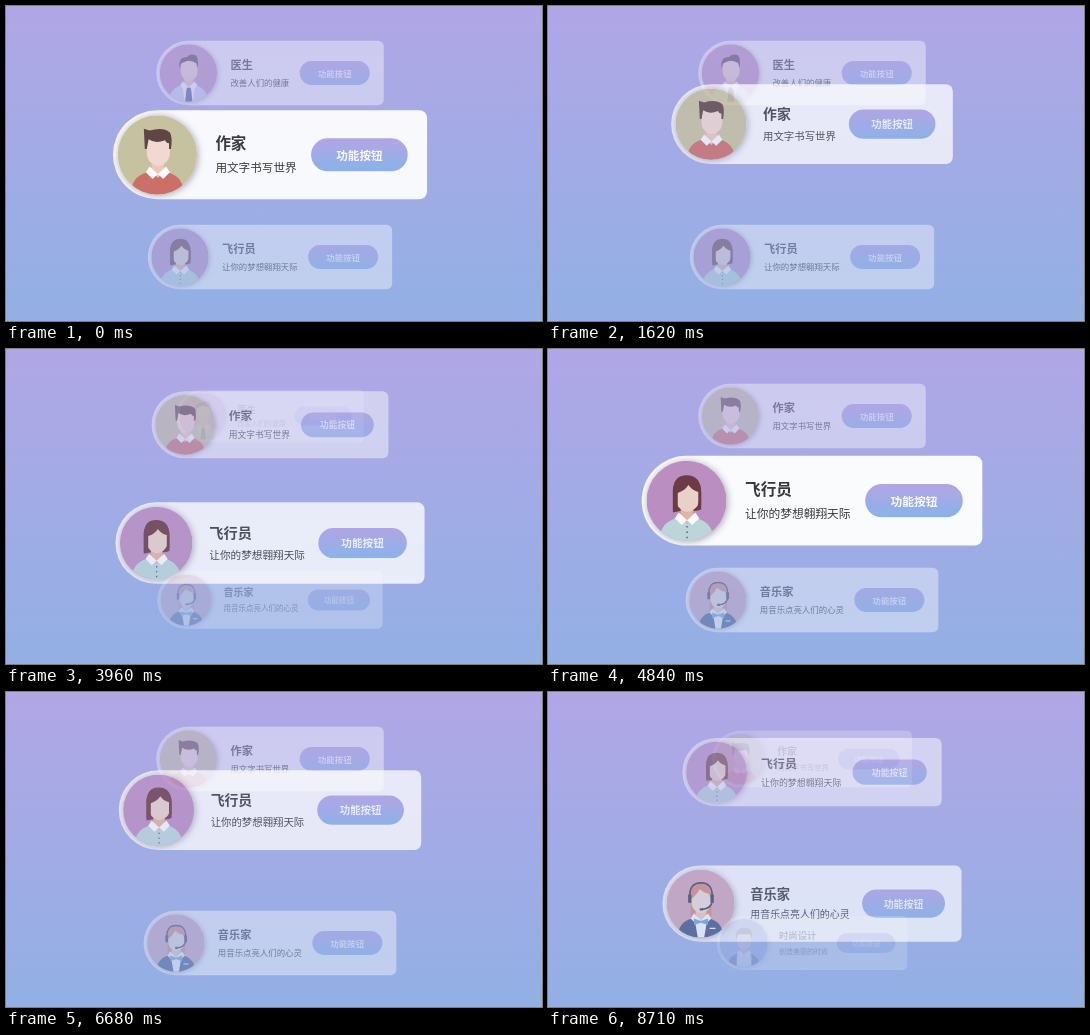
Recreate the animation shown at these times as an HTML page. Size 536 by 315 pixels, loop 8.78 s.

```html
<!DOCTYPE html>
<html lang="zh-CN">
<head>
<meta charset="utf-8">
<title>职业卡片轮播</title>
<style>
html, body { margin: 0; width: 100%; height: 100%; overflow: hidden; }
body {
  position: relative;
  background: linear-gradient(#b1a6e6, #92b0e4);
  font-family: "Noto Sans CJK SC", "Noto Sans CJK", sans-serif;
  color: #333;
}
.card {
  position: absolute; left: 263.5px; top: 113px;
  box-sizing: border-box; height: 92px; padding: 5px 20px 5px 5px;
  display: flex; align-items: center; overflow: hidden;
  background: #fff; border-radius: 46px 8px 8px 46px;
  white-space: nowrap;
}
.card svg {
  width: 82px; height: 82px; border-radius: 50%;
  box-shadow: 1px 1px 8px rgba(50, 40, 70, .42);
}
.info { margin: 0 15px 0 19px; line-height: 26px; font-size: 12px; }
.info b { display: block; font-size: 16px; }
.btn {
  width: 100px; height: 34px; border-radius: 17px;
  background: linear-gradient(#b4a5e4, #88b4ea);
  color: #fff; font-size: 12px; font-weight: 600;
  line-height: 34px; text-align: center;
}
</style>
</head>
<body>
<script>
const shape = (fill, d) => `<path fill="${fill}" d="${d}"/>`;
const line = (color, width, d, dash = 'none') =>
  `<path fill="none" stroke="${color}" stroke-width="${width}" stroke-dasharray="${dash}" d="${d}"/>`;
const torso = fill => shape(fill, 'M13 84Q13 64 30 59L41 57L52 59Q69 64 69 84Z');
const neck = fill => shape(fill, 'M35 46H48V57L41.500 65L35 57Z');
const face = fill => shape(fill, 'M30 24H54V39Q54 47 47 51Q42 54 37 51Q30 47 30 39Z');
const collar = shape('#fff', 'M33 53L41.500 61L50 53L54 59L47 66L41.500 61L36 66L29 59Z');

const people = [
  ['医生', '改善人们的健康', '#bb8dbd',
    torso('#c6d8ee') + shape('#fff', 'M32 57H51L47 84H36Z') + neck('#e6c3ae') + collar +
    shape('#41558d', 'M39 62H44L45 66L47 84H36L38 66Z') + face('#ecd5c5') +
    shape('#49394a', 'M28 35V27Q29 18 39 18Q43 12 52 16Q56 21 54 34L52 27Q44 21 36 25L31 27Z')],
  ['作家', '用文字书写世界', '#c9c49b',
    torso('#cf6c60') + neck('#f0cbb8') + collar + face('#f5ddcf') +
    shape('#593f38', 'M28 35L27 14L33 16Q47 12 54 18Q57 23 55 35L53 35V29Q50 29 49 26Q39 30 32 25L30 35Z')],
  ['飞行员', '让你的梦想翱翔天际', '#bd8dc0',
    shape('#6a363f', 'M27 53V30Q28 15 41 15Q55 15 56 31V50Q49 53 42 50Z') +
    torso('#bdd8d9') + neck('#e7b59c') + collar + face('#ecd4c6') +
    shape('#6a363f', 'M27 50V28Q31 15 43 16Q56 18 56 33V46L53 45V32Q46 30 43 25Q39 31 32 33V50Z') +
    line('#4d5b70', 1.5, 'M41.500 67V80', '1.5 4')],
  ['音乐家', '用音乐点亮人们的心灵', '#d4a5b6',
    shape('#dd8671', 'M29 32H54V58H29Z') + torso('#3f4f80') +
    shape('#fff', 'M33 55H50L45 84H38Z') + neck('#efccbc') + collar + face('#f2dfd6') +
    shape('#dd8671', 'M29 36Q27 18 41 17Q55 18 54 36L51 29Q44 28 40 23Q37 30 29 36Z') +
    shape('#69a5dd', 'M33 59L41.500 62L50 59V67L41.500 64L33 67Z') +
    line('#3b3850', 2, 'M28 34Q27 16 41.500 16Q56 16 55 34M55 38Q54 47 43 48') +
    line('#3b3850', 4, 'M28 30V40M55 30V40') +
    line('#3b3850', 3, 'M40 48H44') + line('#fff', 1.5, 'M52 71H59')],
  ['时尚设计', '创造美丽的时尚', '#8d9fd6',
    torso('#39476f') + shape('#e8edf5', 'M29 62H54V84H29Z') + neck('#d9b39d') +
    collar + face('#d8c8cf') +
    shape('#5a5570', 'M28 34Q26 15 41 15Q57 15 55 34L52 26H32Z')]
];

const cards = people.map(([title, text, color, art]) => {
  const card = document.createElement('div');
  card.className = 'card';
  card.innerHTML = `<svg viewBox="0 0 82 82"><path fill="${color}" d="M0 0H82V82H0Z"/>${art}</svg>
    <div class="info"><b>${title}</b>${text}</div><div class="btn">功能按钮</div>`;
  document.body.append(card);
  return card;
});

// TURN and CENTRED are counted in motion steps
const LOOP = 8780, TURN = 63, CENTRED = 56;

// turns since reaching the centre: offset in card heights, scale, opacity
const path = [
  [-1.25, 1, .5, 0], [-1, 1, .7, .4], [-.25, 1, .7, .4],
  [0, 0, 1, 1], [1, -1, .7, .4], [1.75, -1, .7, .4], [2, -1, .5, 0]
];
// clock in ms: motion step
const steps = [[0, 0], [70, 1], [900, 12], [2740, 35], [3560, 45], [8040, 101], [8710, 110]];

function sample(keys, x) {
  const i = keys.findIndex(key => key[0] > x);
  if (i === 0) return keys[0].slice(1);
  if (i < 0) return keys[keys.length - 1].slice(1);
  const a = keys[i - 1], b = keys[i], p = (x - a[0]) / (b[0] - a[0]);
  return a.slice(1).map((v, j) => v + (b[j + 1] - v) * p);
}

function draw() {
  const step = Math.floor(sample(steps, performance.now() % LOOP)[0] + 1e-6);
  cards.forEach((card, i) => {
    const [y, scale, opacity] = sample(path, (step - CENTRED) / TURN + 2 - i);
    card.style.transform = `translate(-50%, ${y * 100}%) scale(${scale})`;
    card.style.opacity = opacity;
  });
  requestAnimationFrame(draw);
}
draw();
</script>
</body>
</html>
```
